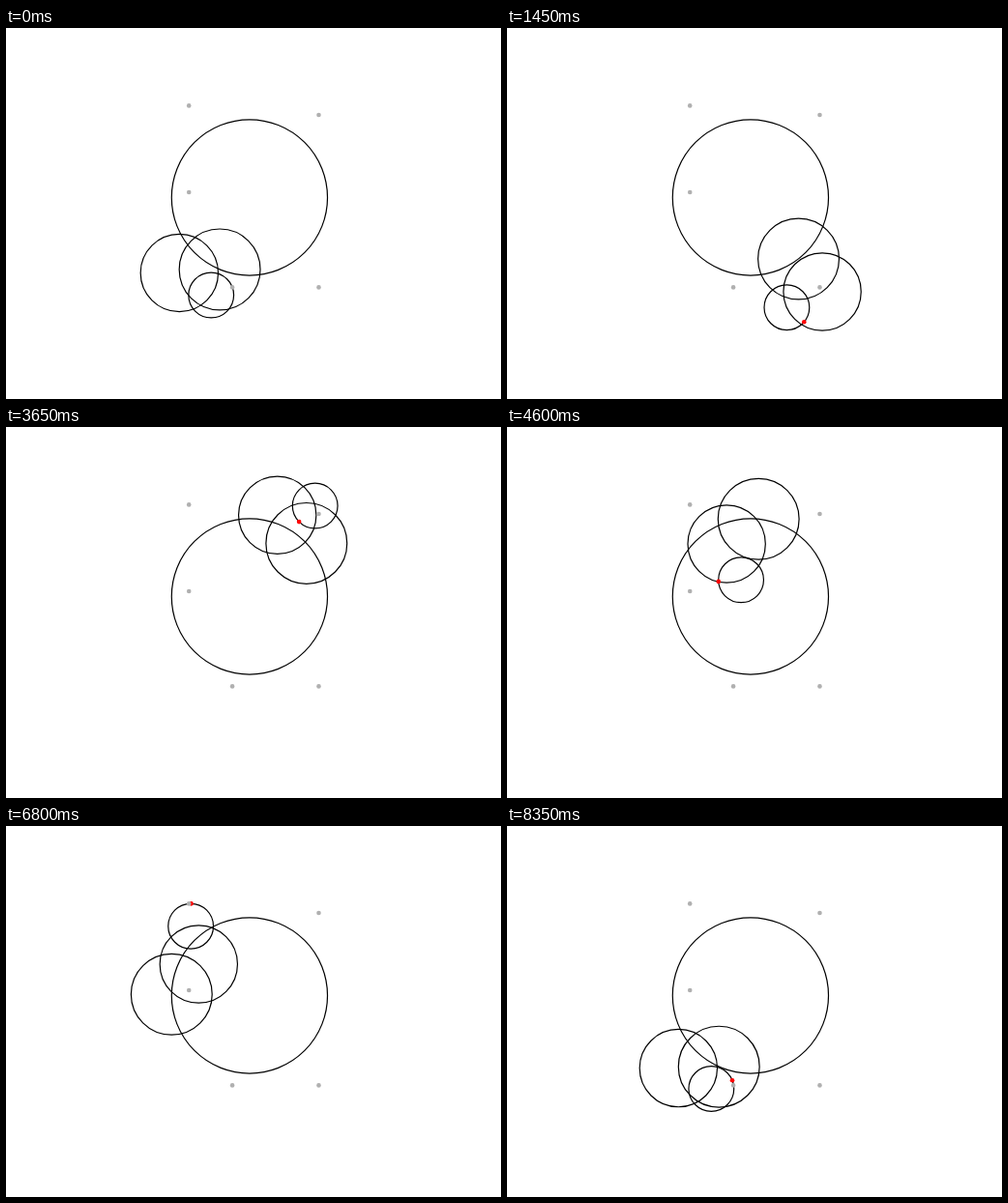
These frames come from a looping animation (512 px wide and 384 px high, 8400 ms). An HTML page with a canvas:

```html
<!DOCTYPE html>
<html lang="en">
<head>
<meta charset="utf-8">
<title>Epicycles through five points</title>
<style>
html, body { margin: 0; width: 512px; height: 384px; overflow: hidden; background: #fff; }
canvas { display: block; }
</style>
</head>
<body>
<canvas id="stage" width="512" height="384"></canvas>
<script>
const ctx = document.getElementById('stage').getContext('2d');
const TAU = 2 * Math.PI, STEP = 50, FRAMES = 168, ADVANCE = 0.006;
const points = [[234.1, 268.4], [323.5, 268.4], [323.5, 90], [189.2, 170], [189.2, 80.4]];
const orders = [0, -1, -2, 2, 1];

// Discrete Fourier coefficient of the points, as radius and phase
const arms = orders.map(k => {
  let x = 0, y = 0;
  points.forEach(([px, py], n) => {
    const a = -TAU * k * n / points.length;
    x += px * Math.cos(a) - py * Math.sin(a);
    y += px * Math.sin(a) + py * Math.cos(a);
  });
  return { k, r: Math.hypot(x, y) / points.length, phase: Math.atan2(y, x) };
});

function dot(x, y, color) {
  ctx.fillStyle = color;
  ctx.beginPath();
  ctx.arc(x, y, 2.3, 0, TAU);
  ctx.fill();
}

function draw(now) {
  const frame = Math.floor(now / STEP) % FRAMES;
  const turn = TAU * ADVANCE * Math.max(0, frame - 1);
  ctx.fillStyle = '#fff';
  ctx.fillRect(0, 0, 512, 384);
  ctx.strokeStyle = '#000';
  ctx.lineWidth = 1.2;

  let x = 0, y = 0;
  for (const { k, r, phase } of arms) {
    if (k) {
      ctx.beginPath();
      ctx.arc(x, y, r, 0, TAU);
      ctx.stroke();
    }
    x += r * Math.cos(phase + k * turn);
    y += r * Math.sin(phase + k * turn);
  }
  if (frame) dot(x, y, '#f00');
  for (const [px, py] of points) dot(px, py, '#b0b0b0');
}

const start = performance.now();
function tick() {
  draw(performance.now() - start);
  requestAnimationFrame(tick);
}
tick();
</script>
</body>
</html>
```
